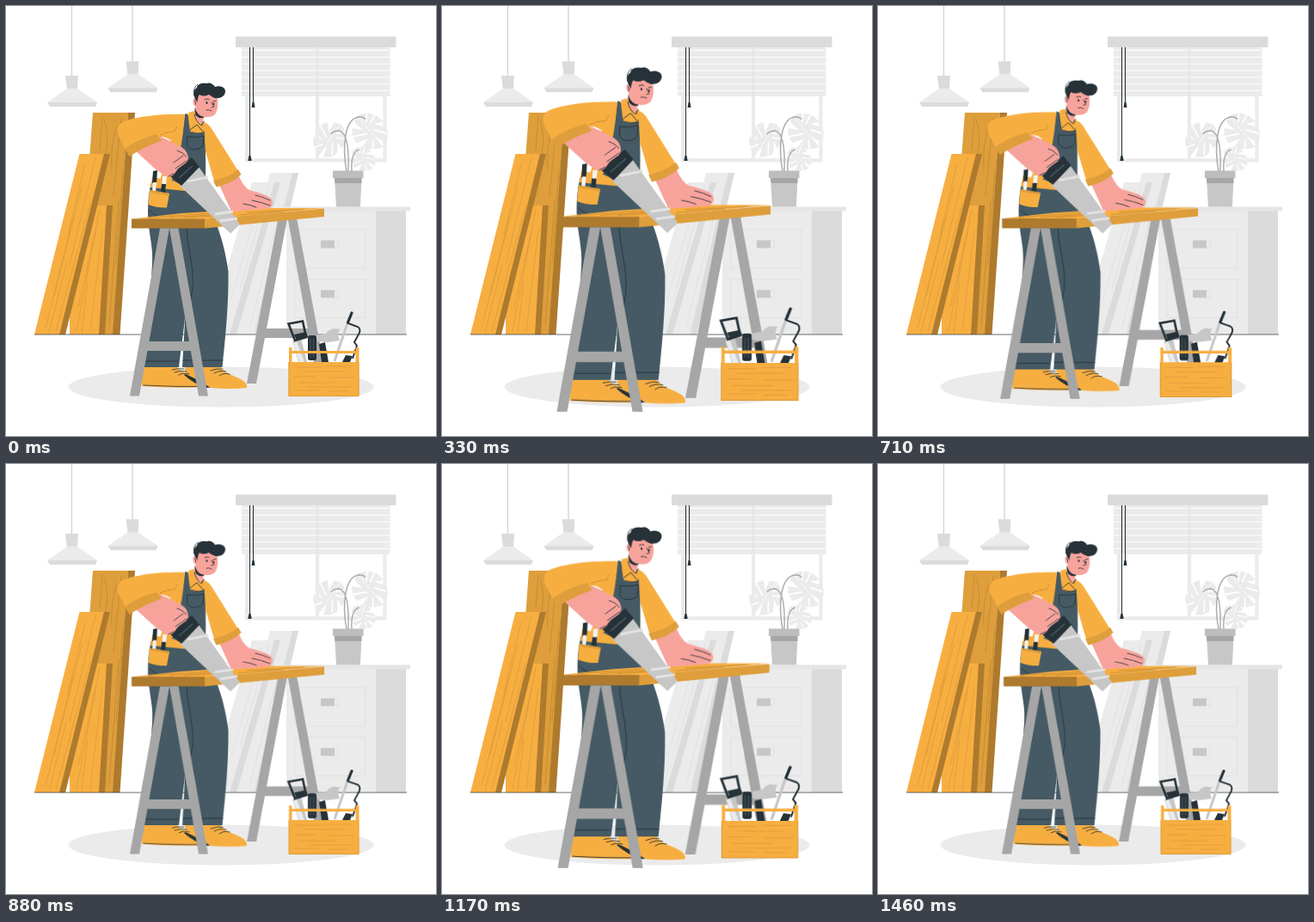
An HTML page for the animation above (1.5 s loop, 500 px wide and 500 px high).

```html
<!DOCTYPE html>
<html lang="en">
<head>
<meta charset="utf-8">
<title>Carpenter at work</title>
<style>
html, body { margin: 0; width: 100%; height: 100%; overflow: hidden; background: #fff; }
svg { display: block; width: 100vw; height: 100vh; }
.beat { animation: beat 1500ms -4ms infinite; }
#worker { transform-origin: 250px 271px; }
#toolbox { transform-origin: 370.5px 404.5px; }
@keyframes beat {
  0%      { transform: scale(1); animation-timing-function: steps(4); }
  11.111% { transform: scale(1.0556); animation-timing-function: steps(4); }
  22.222% { transform: scale(1.1); animation-timing-function: steps(5); }
  36.111% { transform: scale(1.0556); animation-timing-function: steps(5); }
  50%     { transform: scale(1.008); animation-timing-function: steps(3); }
  58.333% { transform: scale(1); animation-timing-function: steps(5); }
  72.222% { transform: scale(1.0778); animation-timing-function: steps(1); }
  75%     { transform: scale(1.1); animation-timing-function: steps(4); }
  86.111% { transform: scale(1.0556); animation-timing-function: steps(4); }
  97.222%, 100% { transform: scale(1); }
}
.or { fill: #f7ae41; }
.mid { fill: #de9e3b; }
.brown { fill: #ae7a2d; }
.navy { fill: #455a64; }
.ink { fill: #263238; }
.skin { fill: #f7a39c; }
.g1 { fill: #ebebeb; }
.g2 { fill: #dbdbdb; }
.g3 { fill: #c7c7c7; }
.g4 { fill: #a6a6a6; }
.line { fill: none; stroke: #263238; stroke-width: .8; stroke-linecap: round; stroke-linejoin: round; }
.grain { fill: none; stroke: #d4943a; stroke-width: .6; }
.pale { fill: none; stroke: #dedede; stroke-width: .8; }
</style>
</head>
<body>
<svg viewBox="0 0 500 500">
  <defs>
    <g id="lamp">
      <path d="M76.5-20V81" fill="none" stroke="#cfcfcf" stroke-width="1.2"/>
      <path class="g2" d="M69 81H84L83 97H71Z"/>
      <path class="g1" d="M71 96H83L106 112H48Z"/>
      <path class="g2" d="M48 112H106L104 117H51Z"/>
    </g>
    <g id="leaf">
      <path d="M0-22C11-20 19-11 18 1L9-4 17 8C15 14 11 18 6 21L2 8 1 22C-7 20-14 15-17 8L-6 5-19 1C-19-5-17-11-13-15L-5-6-7-19Z"/>
      <path d="M5-6L17-12M5 1L13 13M-4 0L-18-7M-3 9L-9 18M3-10L11-19" fill="none" stroke="#fff" stroke-width="1.600"/>
      <path d="M0-20L1 19" fill="none" stroke="#fff" stroke-width=".6"/>
    </g>
    <g id="drawer">
      <rect class="pale" x="336" y="260" width="82" height="45"/>
      <path class="g3" d="M366 272.5H382V281.5H366Z"/>
      <path class="pale" d="M382 273H386.5V281H382"/>
    </g>
  </defs>

  <ellipse cx="250" cy="443" rx="177.5" ry="23.5" fill="#ebebeb"/>

  <use href="#lamp"/>
  <use href="#lamp" x="70.5" y="-16.7"/>

  <!-- window -->
  <path d="M280 48V179.300H440.500V48M362 48V179" fill="none" stroke="#ebebeb" stroke-width="4.200"/>
  <path class="g1" d="M274 48H446.500V105H274Z"/>
  <path d="M274 51.500H446M274 59.500H446M274 67.300H446M274 75.100H446M274 82.900H446M274 90.700H446M274 98.500H446" stroke="#fff" stroke-width="1"/>
  <path d="M362 48V104" stroke="#e0e0e0" stroke-width="3.500" opacity=".5"/>
  <path class="g2" d="M267 35.500H453.500V48H267Z"/>
  <path d="M283.500 48V176M287.500 48V114" stroke="#263238" stroke-width="1.100"/>
  <path class="ink" d="M282.500 174H284.500L285.700 180H281.300ZM286.500 112H288.500L289.500 118H285.500Z"/>

  <!-- grey planks -->
  <path class="g1" d="M307 194H340L296 382H261Z"/>
  <path class="g2" d="M333 194H340L296 382H289Z"/>
  <path class="g1" d="M286 205H319L268 382H235Z"/>
  <path class="g2" d="M312 205H319L268 382H260Z"/>
  <path class="pale" d="M306 208L272 330M328 214L290 376M318 240L284 372M298 214L262 340"/>

  <!-- cabinet -->
  <path class="g1" d="M326 238H430V382H326Z"/>
  <path class="g2" d="M430 238H465V382H430Z"/>
  <path d="M320 233.500H470V238.500H320Z" fill="#e6e6e6"/>
  <use href="#drawer"/>
  <use href="#drawer" y="57.8"/>

  <!-- plant -->
  <g class="g1">
    <use href="#leaf" transform="translate(376 155) rotate(35)"/>
    <use href="#leaf" transform="translate(423 146) rotate(-38) scale(1.06)"/>
    <use href="#leaf" transform="translate(415 178) rotate(-45) scale(.72)"/>
  </g>
  <path d="M396 192C391 165 393 130 411 129C414 129 417 130 418 132M398 192C399 168 397 147 387 145Q381 145 378 149M402 192C401 178 404 168 411 167" fill="none" stroke="#adadad" stroke-width="1.500"/>
  <path class="g3" d="M382 199H413.500L412 233.500H384Z"/>
  <path class="g4" d="M382 200H413.500V206H382.500Z"/>
  <path d="M380 191.500H415.500V200H380Z" fill="#bdbdbd"/>

  <!-- orange planks -->
  <path class="mid" d="M101 124H142L125 382H82Z"/>
  <path class="brown" d="M142 124H150L132.500 382H124Z"/>
  <path class="or" d="M88 232H117L108.500 382H74V345Z"/>
  <path class="brown" d="M117 232H124L115 382H108Z"/>
  <path class="or" d="M85.500 172H115L62.500 382H33Z"/>
  <path class="brown" d="M114 172H121L69 382H62Z"/>
  <path class="grain" d="M92 184L76 250 72 266M104 176L74 300M88 210L56 338M98 230L58 378M78 246L46 374M70 300L50 380M109 236L82 378M112 260L98 378M104 262L84 350M95 320L88 380"/>
  <path d="M114 132Q120 150 116 172M134 130L125 220M129 140Q121 162 123 190M131 226L120 372M136 190L128 300M112 128L109 168" fill="none" stroke="#b8812f" stroke-width=".6"/>

  <path d="M33 382H466" stroke="#263238" stroke-width=".7"/>

  <g id="worker" class="beat">
    <!-- far trestle -->
    <path class="g4" d="M296 375H358V386H294ZM316.500 247H327L291 439H280ZM327.500 246H338L373.500 439H362.500Z"/>

    <!-- shoes -->
    <path class="or" d="M161 419H198C203 426 215 429 225 433C233 436 237 439 236 443Q198 445 158 442Q157 430 161 419Z"/>
    <path class="ink" d="M209 428L231 437 242 443 233 444Q218 439 207 429Z"/>
    <path class="or" d="M208 419H249C253 427 264 429 273 434Q281 438 280 444Q260 446 238 444Q226 436 209 428Z"/>
    <path class="line" d="M193 423Q200 421 207 422M196 426Q203 423 210 425M201 429Q206 426 213 428M238 424Q245 421 252 422M242 427Q249 423 256 425M248 430Q253 426 260 428"/>
    <path class="line" d="M160 441Q198 443 232 442.500" stroke-width=".6"/>

    <!-- trousers -->
    <path class="navy" d="M169 205C165 220 164 240 166 256C168 272 171 284 170 300C168 340 163 380 160.500 420H201C204 395 207 375 208.500 358L205 420H251.500C255 386 259 348 258.500 309C256 289 251 271 246 257L236 205Z"/>
    <path class="line" d="M162 413H200M206 412H252M210 258C211 284 219 302 217 328Q213 352 208.500 370M199 236Q207 234 213 225M167 238Q172 243 180 246"/>

    <!-- torso -->
    <path class="or" d="M204 127L218 126 232 137V212L176 210C184 190 188 172 190 160L196 146Z"/>
    <path class="navy" d="M208.500 125L214 146Q222 150 229 147L228 135 231 137C232 163 233 190 231 240L196 237 172 213 191 207C201 186 206 151 208.500 125Z"/>
    <path class="line" d="M211 152Q221 154 230 151L229 163Q225 167 218 167Q212 166 210.500 162ZM213 145Q221 150 230 147"/>

    <!-- head -->
    <path class="skin" d="M221 110L219 128Q221 139 228 137L231 126Z"/>
    <path class="or" d="M212 124L219 122Q220 134 228 141L230 133 232 138 230 147 223 140 215 147Z"/>
    <path class="line" d="M219 126Q221 135 227 139L230 134M214 144L222 138 229 146"/>
    <path class="skin" d="M222 101Q232 97 245 104C247 112 247 120 243 126Q238 130 231 129C225 126 222 121 221.500 117Q217 116 217.500 110Q218 106 222 107Z"/>
    <path class="ink" d="M219.500 118Q222 128 231 129Q226 132.500 220.500 127Q219 122 219.500 118Z"/>
    <path class="ink" d="M220.500 109C218 104 217 98 222 95C222 91 228 89 233 90Q239 88 243 94C248 92 255 94 255 99C255 105 249 108 243 107Q240 106 236 103Q229 106 225 103Q223 105 222.500 112Z"/>
    <path class="line" d="M218.500 104Q217 95 223 91M231 109Q234 107 236 108.500M241 111L244 110.500M239 112Q240 115 242 117L239 118M233 121Q236 120 239 122M219.500 110Q221 112 220.500 114"/>
    <ellipse class="ink" cx="233.5" cy="112.5" rx="1" ry="1.500"/>
    <ellipse class="ink" cx="241.5" cy="114" rx=".9" ry="1.400"/>

    <!-- tool belt -->
    <path class="or" d="M170 199L194 203 207 209 208 215 168 211Z"/>
    <path class="ink" d="M171 192L176 191 175 206H170Z"/>
    <path d="M171 205H175L173.500 221H169.500ZM182 198H187L186 209H181.500Z" fill="#f2f2f2"/>
    <path class="ink" d="M181 207H186L184.500 221H179.500Z"/>
    <path class="or" d="M167 214L190 218 187 234.500Q176 235 165.500 231Z"/>
    <path class="mid" d="M167 214L190 218 189.500 220.500 166.800 216.500Z"/>

    <!-- table -->
    <path class="or" d="M146 247.500L204 241 300 235H370L231 248.500Z"/>
    <path class="brown" d="M146 247.500H231.500V258.500H146Z"/>
    <path class="mid" d="M231 248L370 235.500V245L231 258.500Z"/>
    <path fill="none" stroke="#c2862f" stroke-width=".7" d="M166 246L237 241M190 246L250 242M280 240L346 236.500M270 243L322 239M208 246L242 244"/>

    <!-- near trestle -->
    <path class="g4" d="M160 390H222L224 401H157ZM179 258.500H190L155 453.500H144ZM190 258.500H200.500L235 453.500H224Z"/>

    <!-- resting arm -->
    <path class="skin" d="M248 208L271 198Q276 210 283 214Q294 217 302 220Q311 224 310 230Q309 235 302 236L262 239Z"/>
    <path class="line" d="M290 220Q299 222 307 226M286 226Q297 228 307 232M276 230Q284 231 291 234" stroke-width=".7"/>
    <path class="or" d="M230 135Q236 137 240 144L270 192 243 207 232 169Z"/>
    <path class="mid" d="M241 203Q258 200 270 190L273.500 196Q262 207 244.500 210.500Z"/>

    <!-- saw -->
    <path class="g3" d="M202 209L224 187 272 254 261 264.500Z"/>
    <path d="M211 204L235 199M243 242L264 239M249 250L269 247" fill="none" stroke="#e3e3e3" stroke-width="2.800"/>
    <path class="ink" d="M191 198L216 176 225 187 204 209Z"/>
    <path d="M201 200L217 186" stroke="#455a64" stroke-width="1.500"/>

    <!-- sawing arm -->
    <path class="skin" d="M150 168L178 151Q190 156 200 162Q210 166 211.500 174Q213 181 207 184L200 189 196 195Q191 201 184 197L173 189Z"/>
    <path class="line" d="M199 168Q206 170 209.500 175M210 180L197 189M206 174L195 182M195 195L189 198"/>
    <path class="or" d="M208 126C184 125 154 128 138 134C127 138 128 147 134 157L140 169 177 153C180 151 186 152 191 156L205 147Z"/>
    <path class="mid" d="M138 166Q153 155 175 149L181 156.500Q160 164 143.500 175Z"/>
    <path d="M179 150Q187 146 196 146L199 140" fill="none" stroke="#b8812f" stroke-width=".6"/>
    <path class="navy" d="M208.500 125L211.500 126 214 146 206 148Z"/>
  </g>

  <g id="toolbox" class="beat">
    <path class="g3" d="M333 390L343 386 350 414H340ZM360 383L372 381Q375 377 380 375L389 376Q384 379 388 389L374 391 362 390Z"/>
    <path d="M334 392L338 390 347 414H341Z" fill="#ebebeb"/>
    <path d="M328.500 369.500L345 366.500 349 385 336 389Z" fill="none" stroke="#263238" stroke-width="2.600"/>
    <path class="ink" d="M335 382L349 379 351 385 338 389Z"/>
    <rect class="ink" x="351" y="383" width="10" height="29" rx="2.5"/>
    <path d="M354 387V408M357.500 387V408" stroke="#455a64" stroke-width="1"/>
    <path class="ink" d="M364 393L371 391 375 414H367Z"/>
    <path d="M397 369L382 413" stroke="#c7c7c7" stroke-width="3"/>
    <path d="M402 357L397.500 368" stroke="#263238" stroke-width="3.200" stroke-linecap="round"/>
    <path d="M398 369L409 373Q412.500 375 411 380L405 391 408 395 403 410" fill="none" stroke="#263238" stroke-width="1.900"/>
    <path class="ink" d="M395 406L403 407 400 414H391Z"/>
    <path class="or" d="M329 397H332.500V414H329ZM406.500 397H410.500V414H406.500Z"/>
    <path class="or" d="M332 401H407V404H332Z"/>
    <path class="or" d="M328.500 414H410.500V454H328.500Z"/>
    <path d="M329 414V453.500H410V414" fill="none" stroke="#de9e3b" stroke-width="1"/>
    <path class="grain" d="M336 420H366M372 419H403M346 425H394M334 431H360M374 432H406M340 438H384M350 443H402M335 447H364M374 448H398"/>
  </g>
</svg>
</body>
</html>
```
